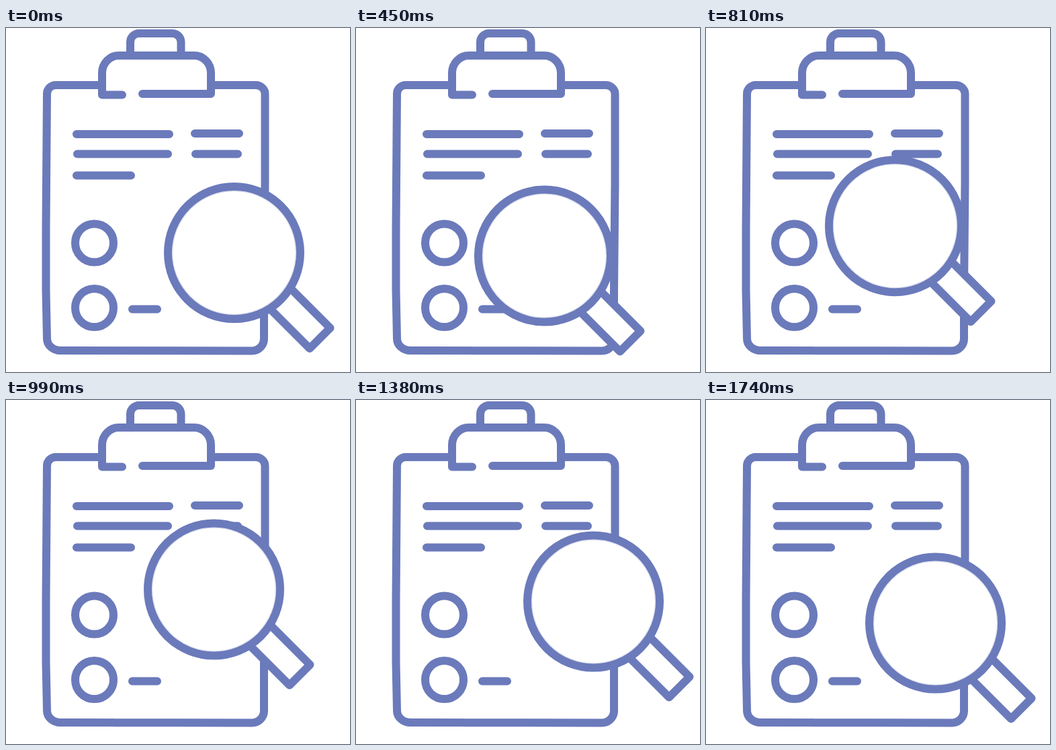
Recreate the animation shown at these times as an HTML page. Size 512 by 512 pixels, loop 1770 ms.

```html
<!DOCTYPE html>
<html lang="en">
<head>
<meta charset="utf-8">
<title>Clipboard search</title>
<style>
  html, body { margin: 0; width: 100%; height: 100%; overflow: hidden; background: #fff; }
  svg { display: block; width: 100%; height: 100%; }
  .ink { fill: none; stroke: #6b7abb; stroke-width: 12; stroke-linecap: round; stroke-linejoin: round; }
  .white { fill: #fff; }
</style>
</head>
<body>
<svg viewBox="0 0 512 512">
  <g class="ink">
    <path d="M143 85H74A13 13 0 0 0 61 98L59.500 300V390L61 462A20 18 0 0 0 81 480L366 480.500A18 18 0 0 0 384 463V390L385.500 230V98A14 13 0 0 0 371 85H305"/>
    <path d="M173 99.500H143V67A25 26 0 0 1 168 41H280A25 26 0 0 1 305 67V98H203"/>
    <path d="M185 39V21A13 13 0 0 1 198 8H247A13 13 0 0 1 260.500 21V39"/>
    <path d="M105 158H243M106 187.500H241M105 219.500H186M281 157H347M282 187.500H345M188 418.500H225"/>
    <circle cx="131.500" cy="320" r="28.500"/>
    <circle cx="131.500" cy="416.500" r="28.500"/>
  </g>
  <g id="glass">
    <path class="ink white" d="M85.500 54.500L143 112L112.500 142.500L55.500 85.500"/>
    <circle class="ink white" r="98.500"/>
    <circle r="91.800" fill="none" stroke="#6b7abb" stroke-opacity=".2" stroke-width="1.500"/>
  </g>
</svg>
<script>
  const LOOP = 1770, STEP = 30, HOLD = 60;
  const PERIOD = (LOOP - HOLD) / STEP;
  const glass = document.getElementById('glass');

  // key points of the closed path, timed in steps
  const keys = [
    { t: 0, x: 339.5, y: 334.5 },
    { t: 7, x: 309.5, y: 349.5 },
    { t: 19, x: 267.5, y: 315.5 },
    { t: 31, x: 309.5, y: 282 },
    { t: 37, x: 335.5, y: 281.5 },
    { t: 44, x: 353.5, y: 300 },
    { t: 54, x: 344.5, y: 327.5 }
  ];
  const count = keys.length;
  const next = i => (i + 1) % count;
  const span = i => (keys[next(i)].t - keys[i].t + PERIOD) % PERIOD;

  // Periodic cubic spline: relax the velocities until acceleration is continuous.
  function velocities(axis) {
    const v = keys.map(() => 0);
    const pull = i => 3 * (keys[next(i)][axis] - keys[i][axis]) / span(i) ** 2;
    for (let pass = 0; pass < 40; pass++) {
      for (let i = 0; i < count; i++) {
        const p = (i + count - 1) % count, a = 1 / span(p), b = 1 / span(i);
        v[i] = (pull(p) + pull(i) - v[p] * a - v[next(i)] * b) / (2 * (a + b));
      }
    }
    return v;
  }
  const speed = { x: velocities('x'), y: velocities('y') };

  function spline(axis, i, u) {
    const j = next(i), v = speed[axis], w = 1 - u;
    return keys[i][axis] * w * w * (1 + 2 * u) + keys[j][axis] * u * u * (3 - 2 * u)
      + span(i) * u * w * (v[i] * w - v[j] * u);
  }

  function draw(now) {
    const step = Math.max(0, Math.floor((now % LOOP - HOLD) / STEP + 1e-6));
    const i = keys.filter(k => k.t <= step).length - 1;
    const u = (step - keys[i].t) / span(i);
    glass.setAttribute('transform', `translate(${spline('x', i, u)} ${spline('y', i, u)})`);
  }

  function tick() {
    draw(performance.now());
    requestAnimationFrame(tick);
  }
  tick();
</script>
</body>
</html>
```
